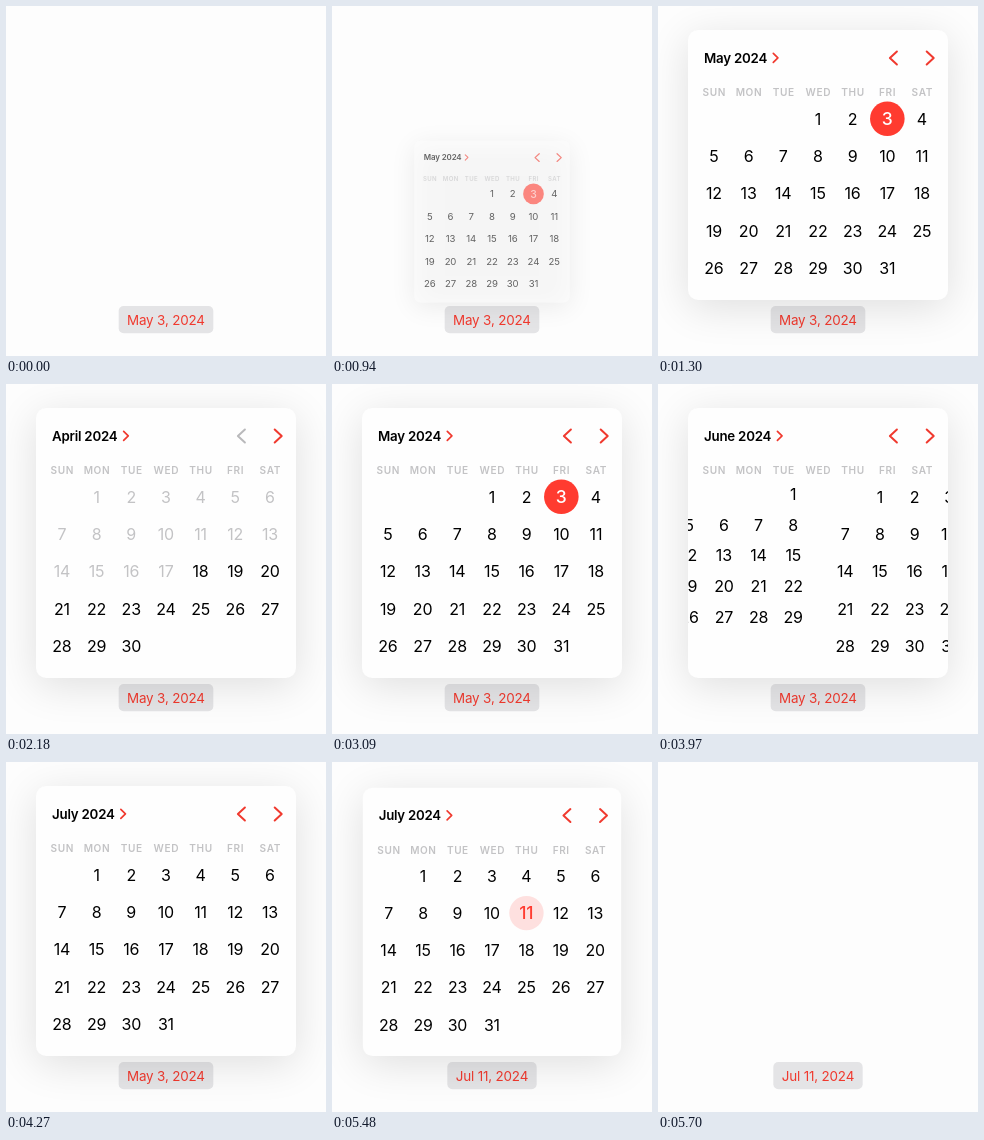
An HTML page with a canvas for the animation above (5.73 s loop, 320x350 px).

```html
<!DOCTYPE html>
<html lang="en">
<head>
<meta charset="utf-8">
<title>Date picker</title>
<style>
  html, body { margin: 0; width: 100%; height: 100%; overflow: hidden; background: #fdfdfd; }
  canvas { display: block; width: 320px; height: 350px; }
</style>
</head>
<body>
<canvas id="stage"></canvas>
<script>
const W = 320, H = 350, LOOP = 5730;
const OPEN = { start: 840, length: 455 };
const CLOSE = { start: 5470, length: 225 };
const PICK_TIME = 4910;
const SLIDE_LENGTH = 395;
const SLIDES = [[1780, -1], [2690, 1], [3270, 1], [3870, 1]];

const CARD = { x: 30, y: 24, w: 260, h: 270, r: 10 };
const COL_X = 56, COL_STEP = 104 / 3;
const RED = '#ff3b30', TINT = '#f0392e', GRAY = '#c3c3c5', INK = '#000';
const DAY_NAMES = ['SUN', 'MON', 'TUE', 'WED', 'THU', 'FRI', 'SAT'];
const MONTHS = { 4: 'April', 5: 'May', 6: 'June', 7: 'July' };

const canvas = document.getElementById('stage');
const ctx = canvas.getContext('2d');
const dpr = window.devicePixelRatio || 1;
canvas.width = W * dpr;
canvas.height = H * dpr;

const clamp = v => Math.max(0, Math.min(1, v));
const phase = (t, { start, length }) => clamp((t - start) / length);

function bezier(x1, y1, x2, y2) {
  const at = (a, b, s) => 3 * (1 - s) * (1 - s) * s * a + 3 * (1 - s) * s * s * b + s * s * s;
  return x => {
    if (x <= 0 || x >= 1) return clamp(x);
    let lo = 0, hi = 1;
    for (let i = 0; i < 24; i++) {
      const mid = (lo + hi) / 2;
      if (at(x1, x2, mid) < x) lo = mid; else hi = mid;
    }
    return at(y1, y2, lo);
  };
}

const slideEase = bezier(0.25, 0.1, 0.15, 1);
const closeEase = bezier(0.3, 0, 0.5, 1);

// Critically damped spring, normalised to reach 1.
function spring(p) {
  const k = 7.5, f = v => 1 - Math.exp(-k * v) * (1 + k * v);
  return f(p) / f(1);
}

function setFont(size, weight, spacing) {
  ctx.font = `${weight} ${size}px Inter, Roboto, sans-serif`;
  ctx.letterSpacing = spacing + 'px';
}

// Draws text vertically centred on its capitals and returns its width.
function text(str, x, y, { size, weight = 400, spacing = 0, color = INK, align = 'center' }) {
  setFont(size, weight, spacing);
  const width = ctx.measureText(str).width - spacing;
  ctx.textAlign = 'left';
  ctx.fillStyle = color;
  ctx.fillText(str, align === 'center' ? x - width / 2 : x, y + size * 0.364);
  return width;
}

function chevron(x, y, w, h, line, color) {
  ctx.strokeStyle = color;
  ctx.lineWidth = line;
  ctx.lineCap = ctx.lineJoin = 'round';
  ctx.beginPath();
  ctx.moveTo(x - w / 2, y - h / 2);
  ctx.lineTo(x + w / 2, y);
  ctx.lineTo(x - w / 2, y + h / 2);
  ctx.stroke();
}

function roundRect(x, y, w, h, r) {
  ctx.beginPath();
  ctx.roundRect(x, y, w, h, r);
  ctx.fill();
}

function button(label) {
  const style = { size: 13.4, spacing: -0.15, color: TINT };
  setFont(style.size, 400, style.spacing);
  const w = ctx.measureText(label).width + 16.8;
  ctx.fillStyle = '#e4e4e6';
  roundRect(W / 2 - w / 2, 300, w, 27.3, 5);
  text(label, W / 2, 313.8, style);
}

function disc(x, y, color) {
  ctx.fillStyle = color;
  ctx.beginPath();
  ctx.arc(x, y, 17.3, 0, Math.PI * 2);
  ctx.fill();
}

function monthPage(month, picked) {
  const lead = new Date(2024, month - 1, 1).getDay();
  const days = new Date(2024, month, 0).getDate();
  const tall = lead + days > 35;
  const top = tall ? 109.8 : 112.7, step = tall ? 30.9 : 37.45;
  for (let d = 1; d <= days; d++) {
    const cell = lead + d - 1;
    const x = COL_X + (cell % 7) * COL_STEP;
    const y = top + Math.floor(cell / 7) * step;
    const style = { size: 16, spacing: -0.2 };
    if (month === 4 && d < 18) style.color = GRAY;
    if (month === picked.month && d === picked.day) {
      const today = month === 5 && d === 3;
      disc(x, y, today ? RED : 'rgba(255,59,48,0.15)');
      Object.assign(style, { size: 17.5, weight: 500, color: today ? '#fff' : RED });
    }
    text(String(d), x, y, style);
  }
}

function card(scale, alpha) {
  ctx.save();
  ctx.shadowColor = 'rgba(0,0,0,0.12)';
  ctx.shadowBlur = 42 * scale * dpr;
  ctx.shadowOffsetY = 8 * scale * dpr;
  ctx.fillStyle = '#fefefe';
  ctx.globalAlpha = alpha;
  roundRect(CARD.x, CARD.y, CARD.w, CARD.h, CARD.r);
  ctx.restore();
}

function popover(pos, picked, scale, alpha) {
  ctx.save();
  ctx.translate(W / 2, 300);
  ctx.scale(scale, scale);
  ctx.translate(-W / 2, -300);
  card(scale, alpha);
  ctx.globalAlpha = alpha;

  const shown = Math.round(pos);
  const title = `${MONTHS[shown]} 2024`;
  const w = text(title, 46, 52, { size: 13.3, weight: 600, spacing: -0.22, align: 'left' });
  chevron(46 + w + 8.3, 51.8, 4.6, 9, 1.7, TINT);
  chevron(235.4, 52, -7, 13, 2, shown === 4 ? '#b9b9bb' : TINT);
  chevron(272.2, 52, 7, 13, 2, TINT);

  DAY_NAMES.forEach((name, i) =>
    text(name, COL_X + i * COL_STEP, 86.7, { size: 10.1, weight: 600, spacing: 0.6, color: GRAY }));

  ctx.beginPath();
  ctx.rect(CARD.x, 94, CARD.w, 200);
  ctx.clip();
  for (let m = 4; m <= 7; m++) {
    const shift = (m - pos) * CARD.w;
    if (Math.abs(shift) >= CARD.w) continue;
    ctx.save();
    ctx.translate(shift, 0);
    monthPage(m, picked);
    ctx.restore();
  }
  ctx.restore();
}

function draw(t) {
  const pos = SLIDES.reduce(
    (sum, [start, dir]) => sum + dir * slideEase(phase(t, { start, length: SLIDE_LENGTH })), 5);
  const picked = t < PICK_TIME ? { month: 5, day: 3 } : { month: 7, day: 11 };
  const opened = phase(t, OPEN), closed = phase(t, CLOSE);

  ctx.setTransform(dpr, 0, 0, dpr, 0, 0);
  ctx.fillStyle = '#fdfdfd';
  ctx.fillRect(0, 0, W, H);
  button(t < PICK_TIME ? 'May 3, 2024' : 'Jul 11, 2024');

  if (opened > 0 && closed < 1) {
    const out = closeEase(closed);
    const scale = (0.2 + 0.8 * spring(opened)) * (1 - 0.7 * out);
    const alpha = clamp(spring(opened) * 1.2) * (1 - out);
    popover(pos, picked, scale, alpha);
  }
}

const begin = performance.now();
function tick() {
  draw((performance.now() - begin) % LOOP);
  requestAnimationFrame(tick);
}
tick();
</script>
</body>
</html>
```
